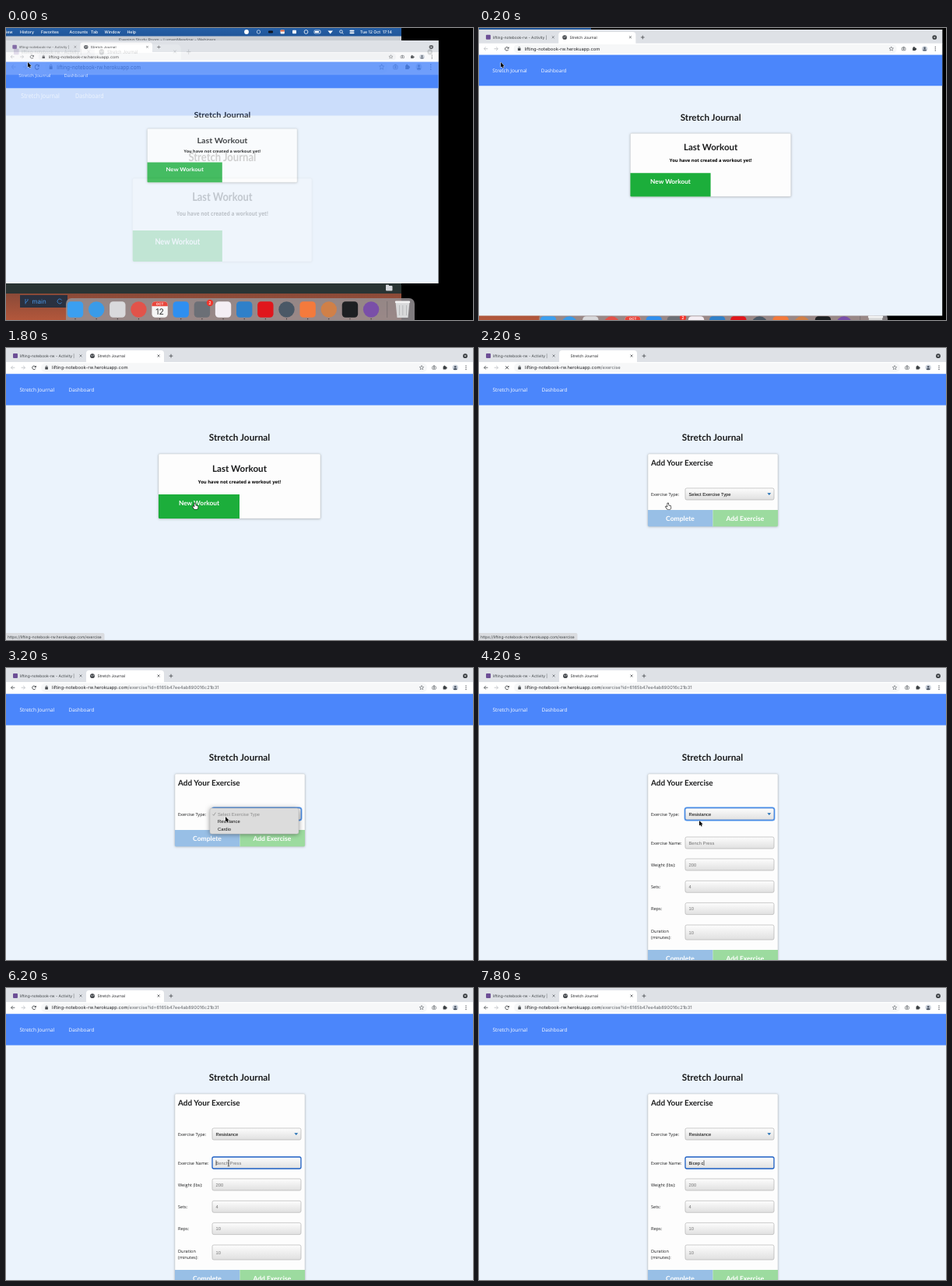
Recreate the animation shown at these times as an HTML page with a canvas. Size 600 by 375 pixels, loop 8 s.

```html
<!DOCTYPE html>
<html lang="en">
<head>
<meta charset="utf-8">
<title>Workout form</title>
<style>
html, body { margin: 0; width: 100%; height: 100%; overflow: hidden; background: #000; }
canvas { display: block; width: 600px; height: 375px; }
</style>
</head>
<body>
<canvas id="stage"></canvas>
<script>
const LOOP = 8000, STEP = 200, WIDTH = 600, HEIGHT = 375, DESK = 508;
const UI = 'Inter, sans-serif';
const BODY = '"Open Sans", sans-serif';
const HEAD = 'Lato, sans-serif';
const FORM = '"Liberation Sans", Arial, sans-serif';
const APP = 'Stretch Journal';
const SITE = 'lifting-notebook-rw';
const HOST = SITE + '.herokuapp.com';
const INK = '#1b1c1d', GREY = '#5f6368';

const ratio = window.devicePixelRatio || 1;

function prepare(canvas) {
  canvas.width = WIDTH * ratio;
  canvas.height = HEIGHT * ratio;
  const ctx = canvas.getContext('2d');
  ctx.textRendering = 'geometricPrecision';
  return ctx;
}

const screen2d = prepare(document.getElementById('stage'));
const layer2d = prepare(document.createElement('canvas'));
let c = screen2d;

function rect(x, y, w, h, fill, r = 0) {
  c.fillStyle = fill;
  c.beginPath();
  c.roundRect(x, y, w, h, r);
  c.fill();
}

function frame(x, y, w, h, color, r = 0, line = 0.6) {
  c.strokeStyle = color;
  c.lineWidth = line;
  c.beginPath();
  c.roundRect(x, y, w, h, r);
  c.stroke();
}

function dot(x, y, r, fill) {
  c.fillStyle = fill;
  c.beginPath();
  c.arc(x, y, r, 0, 7);
  c.fill();
}

function arc(x, y, r, from, to, color, line) {
  c.strokeStyle = color;
  c.lineWidth = line;
  c.beginPath();
  c.arc(x, y, r, from, to);
  c.stroke();
}

function poly(points, fill, stroke, line = 0.8) {
  c.beginPath();
  points.forEach(([x, y], i) => i ? c.lineTo(x, y) : c.moveTo(x, y));
  if (fill) {
    c.closePath();
    c.fillStyle = fill;
  }
  if (stroke) {
    c.strokeStyle = stroke;
    c.lineWidth = line;
    c.stroke();
  }
  if (fill) c.fill();
}

function text(str, x, y, size, family, color = INK, weight = 400, align = 'left') {
  c.font = `${weight} ${size}px ${family}`;
  c.fillStyle = color;
  c.textAlign = align;
  c.fillText(str, x, y);
  return c.measureText(str).width;
}

function shade(y0, y1, from, to) {
  const g = c.createLinearGradient(0, y0, 0, y1);
  g.addColorStop(0, from);
  g.addColorStop(1, to);
  return g;
}

function withShadow(blur, alpha, paint) {
  c.save();
  c.shadowColor = `rgba(0,0,0,${alpha})`;
  c.shadowBlur = blur * ratio;
  c.shadowOffsetY = 0.5 * ratio;
  paint();
  c.restore();
}

function cross(x, y, r, color, line = 0.7) {
  poly([[x - r, y - r], [x + r, y + r]], null, color, line);
  poly([[x + r, y - r], [x - r, y + r]], null, color, line);
}

function arrow(x, y, dir, color) {
  poly([[x - 2.4, y], [x + 2.4, y]], null, color);
  poly([[x + dir * 0.2, y - 2.3], [x + dir * 2.5, y], [x + dir * 0.2, y + 2.3]], null, color);
}

// Browser chrome

function tabStrip(W, s) {
  rect(0, 0, W, 19, '#dee1e6');
  rect(9, 7, 6, 6, '#6d4f96', 1);
  text(SITE + ' - Activity |', 18, 12, 4.9, UI, '#3c4043');
  cross(96, 10, 1.5, GREY);
  rect(103, 3, 100, 17, '#fff', [4, 4, 0, 0]);
  if (!s.loading) {
    dot(111, 10.2, 2.9, '#45484c');
    poly([[109.4, 9], [111, 9.6], [110.6, 11.6]], '#dfe3e8');
    poly([[112, 8.2], [113, 10], [112, 10.4]], '#dfe3e8');
  }
  text(APP, 117.5, 12, 4.9, UI, '#202124');
  cross(196, 10, 1.5, '#45484c');
  poly([[209.6, 10.2], [214.4, 10.2]], null, '#45484c');
  poly([[212, 7.8], [212, 12.6]], null, '#45484c');
  dot(W - 10, 10.2, 2.9, '#3c4043');
  poly([[W - 11.5, 9.6], [W - 8.5, 9.6], [W - 10, 11.4]], '#dee1e6');
}

function toolIcons(W) {
  const star = Array.from({ length: 10 }, (_, i) => {
    const a = i * Math.PI / 5 - Math.PI / 2, r = i % 2 ? 1.3 : 2.9;
    return [W - 66 + r * Math.cos(a), 25.3 + r * Math.sin(a)];
  });
  poly([...star, star[0]], null, GREY, 0.6);
  frame(W - 52.4, 23.6, 4.8, 3.7, GREY, 0.8, 0.7);
  dot(W - 50, 25.4, 1, GREY);
  rect(W - 51, 22.6, 2, 1, GREY);
  rect(W - 38.4, 23.6, 4, 4, '#3c4043', 0.5);
  dot(W - 36.6, 23.5, 1, '#3c4043');
  dot(W - 34.2, 25.5, 1, '#3c4043');
  dot(W - 22.8, 25.2, 3.6, '#c9d0da');
  dot(W - 22.8, 24.2, 1.3, '#4b5563');
  rect(W - 25, 26, 4.4, 1.9, '#4b5563', [1.6, 1.6, 0.6, 0.6]);
  [22.9, 25.2, 27.5].forEach(y => dot(W - 9, y, 0.65, '#45484c'));
}

function toolbar(W, s) {
  rect(0, 18, W, 15.2, '#fff');
  arrow(9, 25.2, -1, s.form ? '#45484c' : '#b9bcc1');
  arrow(22, 25.2, 1, '#b9bcc1');
  if (s.loading) {
    cross(36, 25.2, 2, '#45484c', 0.9);
  } else {
    arc(36, 25.3, 2.3, 0.4, 5.6, '#45484c', 0.9);
    poly([[38.8, 22.4], [38.8, 25], [36.2, 25]], '#45484c');
  }
  rect(45, 19.3, W - 104, 11.8, '#f6f7f8', 6);
  rect(50.3, 24.6, 3.6, 3, '#45484c', 0.4);
  frame(51.1, 22.8, 2, 2.6, '#45484c', 1);
  const w = text(HOST, 59, 27.2, 5.83, UI, '#202124');
  text(s.path, 59 + w, 27.2, 5.83, UI, GREY);
  toolIcons(W);
}

// Page content

function card(x, y, w, h) {
  withShadow(3, 0.3, () => rect(x, y, w, h, '#fdfdfd', 1.5));
  frame(x, y, w, h, '#cfd3d6', 1.5, 0.5);
}

function lastWorkout(mid) {
  card(mid - 104, 136, 208, 83);
  text('Last Workout', mid, 158.5, 11.6, HEAD, INK, 700, 'center');
  text('You have not created a workout yet!', mid, 173.6, 5.9, BODY, '#000', 700, 'center');
  rect(mid - 104, 188, 104, 31, '#1cae3b', [0, 0, 0, 1.5]);
  text('New Workout', mid - 52, 202, 8.35, HEAD, '#fff', 700, 'center');
}

function field(y, h, focus) {
  if (focus === 'ring') frame(264.6, y - 0.4, 114.8, h + 0.8, '#5b9df0', 2.5, 2);
  rect(265, y, 114, h, shade(y, y + h, '#fdfdfd', '#e0e0e0'), 2);
  frame(265, y, 114, h, focus ? '#1c5fc4' : '#a9a9a9', 2, focus === 'line' ? 1.3 : 0.6);
}

function inputs(s) {
  const rows = [
    ['Exercise Name:', 217, 'Bench Press'], ['Weight (lbs):', 245, '200'],
    ['Sets:', 273.3, '4'], ['Reps:', 301.6, '10'], ['', 330, '10']
  ];
  rows.forEach(([label, y, hint], i) => {
    const h = i === 4 ? 19 : 15;
    const base = y + h / 2 + 2.2;
    const typed = i === 0 ? s.typed : '';
    text(label, 221, base, 5.56, BODY);
    field(y, h, i === 0 && s.focus ? 'line' : '');
    const w = text(typed || hint, 269.5, base - 0.2, 5.8, FORM, typed ? '#000' : '#757575');
    if (i === 0 && s.focus) rect(269.7 + (typed ? w : 0), y + 4.3, 0.6, 6.6, '#111');
  });
  text('Duration', 221, 340, 5.56, BODY);
  text('(minutes):', 221, 347.6, 5.56, BODY);
}

function popup(s) {
  withShadow(6, 0.45, () => rect(262, 180, 114, 33, '#dcdcdc', 2.5));
  frame(262, 180, 114, 33, '#bcbcbc', 2.5, 0.5);
  if (s.hover) rect(262, 192, 114, 9.6, '#2f7bf0');
  poly([[265.4, 187.8], [266.8, 189.4], [269.4, 185.6]], null, '#8d8d8d');
  text('Select Exercise Type', 272, 189.8, 5.8, FORM, '#8d8d8d');
  text('Resistance', 272, 199.3, 5.8, FORM, s.hover ? '#fff' : '#111');
  text('Cardio', 272, 208.8, 5.8, FORM, '#111');
}

function exerciseForm(s) {
  const foot = s.chosen ? 362 : 208;
  card(217, 136, 167, foot + 21 - 136);
  text('Add Your Exercise', 221, 150.6, 10, HEAD, INK, 700);
  text('Exercise Type:', 221, 190, 5.56, BODY);
  field(180, 15, s.ring ? 'ring' : '');
  text(s.chosen ? 'Resistance' : 'Select Exercise Type', 269.5, 189.7, 5.8, FORM, '#000');
  poly([[370.4, 186.2], [375.2, 186.2], [372.8, 189]], '#1f6db3');
  if (s.chosen) inputs(s);
  rect(217, foot, 83.5, 21.3, '#98bfe6', [0, 0, 0, 1.5]);
  rect(300.5, foot, 83.5, 21.3, '#9cdb9f', [0, 0, 1.5, 0]);
  text('Complete', 258.5, foot + 14, 8.55, HEAD, '#fff', 700, 'center');
  text('Add Exercise', 341.8, foot + 14, 8.5, HEAD, '#fff', 700, 'center');
  if (s.popup) popup(s);
}

function browser(W, s) {
  const mid = W / 2;
  rect(0, 0, W, HEIGHT, '#ebf3fc');
  tabStrip(W, s);
  toolbar(W, s);
  rect(0, 33.2, W, 40.4, '#4b86fb');
  text(APP, 17.5, 56.2, 6.5, BODY, '#fff', 500);
  text('Dashboard', 80.5, 56.2, 6.4, BODY, '#fff', 500);
  text(APP, mid, 119, 11.8, HEAD, INK, 700, 'center');
  s.form ? exerciseForm(s) : lastWorkout(mid);
  if (s.status) {
    rect(0, 366, 126.5, 9, '#dadce0', [0, 2, 0, 0]);
    text('https://' + HOST + '/exercise', 2, 372.6, 4.95, UI, '#3c4043');
  }
}

function placed(sx, sy, y, W, s) {
  c.save();
  c.translate(0, y);
  c.scale(sx, sy);
  browser(W, s);
  c.restore();
}

// The enlarged page fades as one flat layer over the window
function fadingPage(alpha, s) {
  c = layer2d;
  c.setTransform(ratio, 0, 0, ratio, 0, 0);
  placed(1.107, 1.29, 17.5, 502, s);
  c = screen2d;
  c.save();
  c.beginPath();
  c.rect(0, 17.5, 555.6, 310.5);
  c.clip();
  c.globalAlpha = alpha;
  c.drawImage(layer2d.canvas, 0, 0, WIDTH, HEIGHT);
  c.restore();
}

// Desktop behind the window

function dock(drop) {
  const colors = ['#3b9ff0', '#3a9be8', '#d9d9dc', '#e2534a', '#f6f6f6', '#2f8ff0', '#6b6f76', '#f4eef4',
    '#2f80c9', '#e0161c', '#4a5866', '#f47a3c', '#d08048', '#1d1f22', '#7a4fa8'];
  const round = [1, 3, 10, 12, 14];
  c.save();
  c.translate(0, drop);
  rect(77, 347, 448, 34, 'rgba(150,145,148,.85)', 7);
  colors.forEach((color, i) => {
    const x = 89 + 27.15 * i;
    if (round.includes(i)) dot(x, 361.5, 10.2, color);
    else rect(x - 10.2, 351.3, 20.4, 20.4, color, 4.5);
    dot(x, 373.6, 0.6, '#222');
  });
  rect(187.4, 351.3, 20.4, 6, '#e8463c', [4.5, 4.5, 0, 0]);
  text('OCT', 197.6, 356, 4.4, UI, '#fff', 600, 'center');
  text('12', 197.6, 368, 10.5, UI, '#333', 400, 'center');
  dot(262, 353, 4.2, '#f0352c');
  text('2', 262, 355, 5.5, UI, '#fff', 500, 'center');
  rect(489.5, 351, 0.6, 21, '#6c6769');
  poly([[500.5, 352], [518.5, 352], [516.5, 372], [502.5, 372]], '#d8d9da');
  rect(499.8, 350.6, 19.4, 2.6, '#f3f3f3', 1.3);
  [505, 509.5, 514].forEach(x => rect(x, 356, 0.7, 13, '#a9abad'));
  c.restore();
}

function menuBar() {
  rect(0, 0, DESK, 10.5, shade(0, 10, '#255fa6', '#20569a'));
  const items = [['iew', 0], ['History', 18], ['Favorites', 45], ['Accounts', 81.5], ['Tab', 109], ['Window', 126.5], ['Help', 155.5]];
  items.forEach(([name, x]) => text(name, x, 7, 5.2, UI, '#fff', 500));
  dot(309, 5, 2.9, '#fff');
  arc(324.5, 5, 2.2, 0, 7, '#c9d8ec', 0.8);
  rect(337, 3.4, 6, 3, '#10151f', 1);
  rect(352.5, 2.6, 5.4, 4.8, '#f0f0f0', 1);
  rect(352.5, 2.6, 5.4, 2, '#e2653f', [1, 1, 0, 0]);
  rect(368, 2.8, 5, 4.4, '#f2f5fa', 0.8);
  arc(385.5, 5, 2.4, 0, 7, '#fff', 0.8);
  frame(396, 3, 8, 4, '#fff', 1, 0.7);
  rect(397, 4, 5, 2, '#fff');
  poly([[413.5, 3.6], [420, 3.6], [416.7, 7.4]], '#fff');
  arc(430.5, 4.6, 1.8, 0, 7, '#fff', 0.8);
  poly([[431.8, 6], [433.4, 7.6]], null, '#fff');
  rect(441.5, 2.8, 6, 1.7, '#fff', 0.8);
  rect(441.5, 5.5, 6, 1.7, '#fff', 0.8);
  text('Tue 12 Oct  17:14', 455, 7, 5.2, UI, '#fff', 500);
}

function desktop(drop) {
  rect(0, 0, WIDTH, HEIGHT, '#000');
  rect(0, 10, DESK, 318, '#c9cdd3');
  text('Evening Study Room - LumenMeadow - Webinars', 145, 17, 5.3, UI, '#5c6066');
  rect(0, 326, DESK, 15, '#2a3433');
  rect(488, 331, 8.5, 6.5, '#d5d8dc', 1);
  rect(488, 329.8, 4, 2, '#d5d8dc', 0.6);
  rect(0, 341, DESK, 34, shade(341, 375, '#8a4a38', '#b3573b'));
  rect(18, 343, 61, 16, '#2a3140');
  arc(69, 351, 3, 0.5, 5.8, '#3f8fe0', 0.8);
  poly([[25, 348], [25, 354.5]], null, '#3f8fe0');
  poly([[25, 353], [28, 350], [28, 348]], null, '#3f8fe0');
  text('main', 33.5, 354, 8, UI, '#4b97e6');
  menuBar();
  dock(drop);
}

// Pointers

function pointer({ x, y, kind }) {
  c.save();
  c.translate(x, y);
  c.lineJoin = 'round';
  if (kind === 'arrow') {
    poly([[0, 0], [0, 6.6], [1.5, 5.2], [2.6, 7.6], [3.7, 7.1], [2.7, 4.8], [4.7, 4.7], [0, 0]], '#000', '#fff', 0.9);
  } else if (kind === 'hand') {
    poly([[-0.8, -3.6], [0.4, -3.6], [0.6, -0.8], [3.4, 0], [3.6, 2.2], [2.6, 4], [-1, 4], [-3.2, 0.8], [-2.4, 0.2], [-0.8, 1.4], [-0.8, -3.6]],
      '#fff', '#111', 1.2);
  } else {
    poly([[0, -3.6], [0, 3.6]], null, '#222');
    poly([[-1.3, -3.8], [1.3, -3.8]], null, '#222', 0.6);
    poly([[-1.3, 3.8], [1.3, 3.8]], null, '#222', 0.6);
  }
  c.restore();
}

// Each stop: time, x, y
const track = [[200, 28, 44], [1000, 203, 219], [1600, 243, 203], [2400, 243, 203], [3000, 282, 191],
  [3800, 282, 191], [4000, 283, 196], [5000, 283, 196], [5800, 286, 225], [8000, 286, 225]];

function pointerAt(t) {
  const i = Math.max(1, track.findIndex(stop => stop[0] > t));
  const [a, b] = [track[i - 1], track[i]];
  const k = Math.max(0, (t - a[0]) / (b[0] - a[0]));
  const e = k * k * (3 - 2 * k);
  const hand = t >= 1200 && t < 2600, beam = t >= 5600;
  return {
    x: a[1] + (b[1] - a[1]) * e,
    y: a[2] + (b[2] - a[2]) * e,
    kind: hand ? 'hand' : beam ? 'beam' : 'arrow'
  };
}

function stateAt(t) {
  const form = t >= 2000, saved = t >= 2600;
  return {
    form,
    loading: form && !saved,
    path: saved ? '/exercise?id=6165b47ee4ab890016c21b31' : form ? '/exercise' : '',
    status: t >= 1400 && !saved,
    popup: t >= 3000 && t < 4200,
    hover: t >= 4000,
    chosen: t >= 4200,
    ring: t >= 3000 && t < 5800,
    focus: t >= 5800,
    typed: 'Bicep c'.slice(0, Math.max(0, (t - 6400) / STEP))
  };
}

function draw(time) {
  const t = Math.floor(time % LOOP / STEP) * STEP;
  const s = stateAt(t);
  c.setTransform(ratio, 0, 0, ratio, 0, 0);
  if (t < 200) {
    desktop(0);
    placed(0.926, 0.832, 16, WIDTH, s);
    fadingPage(0.2, s);
  } else if (t < 400) {
    desktop(19);
    rect(0, 0, WIDTH, 3, '#000');
    rect(0, 0, 144, 3, '#20569a');
    placed(0.992, 0.98, 2, WIDTH, s);
  } else {
    browser(WIDTH, s);
  }
  if (!s.typed) pointer(pointerAt(t));
}

function tick(now) {
  draw(now);
  requestAnimationFrame(tick);
}
requestAnimationFrame(tick);
</script>
</body>
</html>
```
